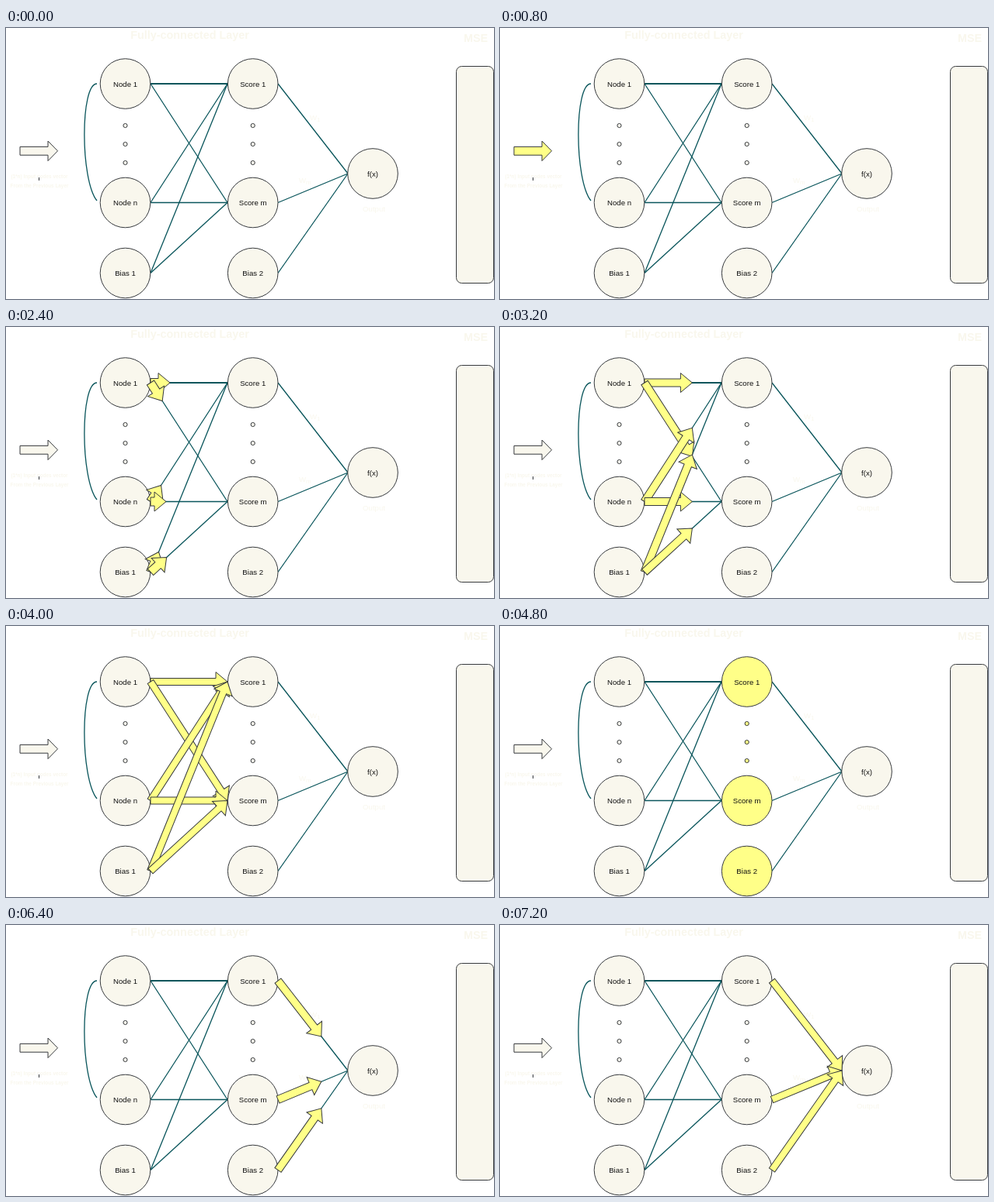
Animation of 628x350 px, one loop 8000 ms. Source, as an HTML page with a canvas:

```html
<!DOCTYPE html>
<html lang="en">
<head>
<meta charset="utf-8">
<title>Forward pass</title>
<style>
html, body { margin: 0; width: 100%; height: 100%; overflow: hidden; background: #fff; }
canvas { display: block; width: 628px; height: 350px; }
</style>
</head>
<body>
<canvas id="stage" width="628" height="350"></canvas>
<script>
const ctx = document.getElementById('stage').getContext('2d');
const CREAM = '#f9f7ed', YELLOW = '#ffff88', INK = '#36393d', TEAL = '#09555b';
const STEP = 800, STEPS = 10;
const FONT = '"Liberation Sans", Arial, sans-serif';
const ROWS = [72, 225.5, 316.5];
const DOT_ROWS = [126, 150, 174];
const INPUTS = ['Node 1', 'Node n', 'Bias 1'];
const SCORES = ['Score 1', 'Score m', 'Bias 2'];

// x1, y1, x2, y2, length of the arrow when it first appears
const hiddenLinks = [
  [186, 72, 285, 72, 25],
  [186, 72, 285, 225.5, 28],
  [186, 225.5, 285, 72, 25],
  [186, 225.5, 285, 225.5, 20],
  [186, 316.5, 285, 72, 28],
  [186, 316.5, 285, 225.5, 28]
];
const outputLinks = ROWS.map(y => [350, y, 440, 188, 25]);

function paint(fill, stroke = INK, width = 1) {
  ctx.fillStyle = fill;
  ctx.fill();
  ctx.strokeStyle = stroke;
  ctx.lineWidth = width;
  ctx.stroke();
}

function label(text, x, y, size, color = CREAM, weight = 'normal', align = 'center') {
  ctx.font = `${weight} ${size}px ${FONT}`;
  ctx.textAlign = align;
  ctx.fillStyle = color;
  ctx.fillText(text, x, y);
}

function disc(x, y, r, fill) {
  ctx.beginPath();
  ctx.arc(x, y, r, 0, Math.PI * 2);
  paint(fill);
}

function node(text, x, y, fill) {
  disc(x, y, 32.3, fill);
  label(text, x, y + 3.5, 9.6, '#111');
}

function column(names, x, fill) {
  names.forEach((name, i) => node(name, x, ROWS[i], fill));
  DOT_ROWS.forEach(y => disc(x, y, 2.6, fill));
}

function line([x1, y1, x2, y2], width = 1.3) {
  ctx.beginPath();
  ctx.moveTo(x1, y1);
  ctx.lineTo(x2, y2);
  ctx.strokeStyle = TEAL;
  ctx.lineWidth = width;
  ctx.stroke();
}

function arrow(x, y, angle, length, shaft, head, headLength, fill) {
  const neck = length - headLength;
  ctx.save();
  ctx.translate(x, y);
  ctx.rotate(angle);
  ctx.beginPath();
  ctx.moveTo(0, -shaft);
  ctx.lineTo(neck, -shaft);
  ctx.lineTo(neck, -head);
  ctx.lineTo(length, 0);
  ctx.lineTo(neck, head);
  ctx.lineTo(neck, shaft);
  ctx.lineTo(0, shaft);
  ctx.closePath();
  paint(fill);
  ctx.restore();
}

// stage: 0 = just leaving, 1 = on the way, 2 = arrived
function flow(links, stage) {
  for (const [x1, y1, x2, y2, start] of links) {
    const full = Math.hypot(x2 - x1, y2 - y1);
    const length = [start, full * 0.62, full][stage];
    const shaft = [5.5, 5, 4.5][stage];
    arrow(x1, y1, Math.atan2(y2 - y1, x2 - x1), length, shaft, 12.5, 15, YELLOW);
  }
}

function labels() {
  label('Fully-connected Layer', 236.5, 14, 14.4, CREAM, 'bold');
  label('MSE', 604.5, 18, 14.4, CREAM, 'bold');
  label('(1*n) Input nodes vector', 43, 194, 6.4, CREAM, 'bold');
  label('From the Previous Layer', 43, 206, 6.4, CREAM, 'bold');
  label('Output', 473.5, 236.5, 9.6);
  label('W', 391, 118.5, 9.6, CREAM, 'normal', 'left');
  label('1', 400, 121, 8, CREAM, 'normal', 'left');
  label('W', 377, 199.5, 9.6, CREAM, 'normal', 'left');
  label('m', 386, 202, 8, CREAM, 'normal', 'left');
  ctx.fillStyle = INK;
  ctx.fillRect(42, 193, 1, 4);
}

function draw(step) {
  const lit = when => step === when ? YELLOW : CREAM;
  ctx.fillStyle = '#fff';
  ctx.fillRect(0, 0, 628, 350);

  labels();
  hiddenLinks.forEach((link, i) => line(link, i === 0 ? 1.8 : 1.3));
  outputLinks.forEach(link => line(link));

  ctx.beginPath();
  ctx.moveTo(117, 72);
  ctx.bezierCurveTo(95.5, 72, 95.5, 196, 117, 223);
  ctx.strokeStyle = TEAL;
  ctx.lineWidth = 1.3;
  ctx.stroke();

  arrow(18, 158.8, 0, 48.5, 5.4, 12.8, 12.5, lit(1));
  column(INPUTS, 153.5, lit(2));
  column(SCORES, 317.7, lit(6));
  node('f(x)', 472, 188, CREAM);

  ctx.beginPath();
  ctx.roundRect(579.5, 49.5, 48, 280, 7);
  paint(CREAM);

  if (step >= 3 && step <= 5) flow(hiddenLinks, step - 3);
  if (step >= 7) flow(outputLinks, step - 7);
}

const begin = performance.now();
function tick() {
  draw(Math.floor((performance.now() - begin) / STEP) % STEPS);
  requestAnimationFrame(tick);
}
tick();
</script>
</body>
</html>
```
